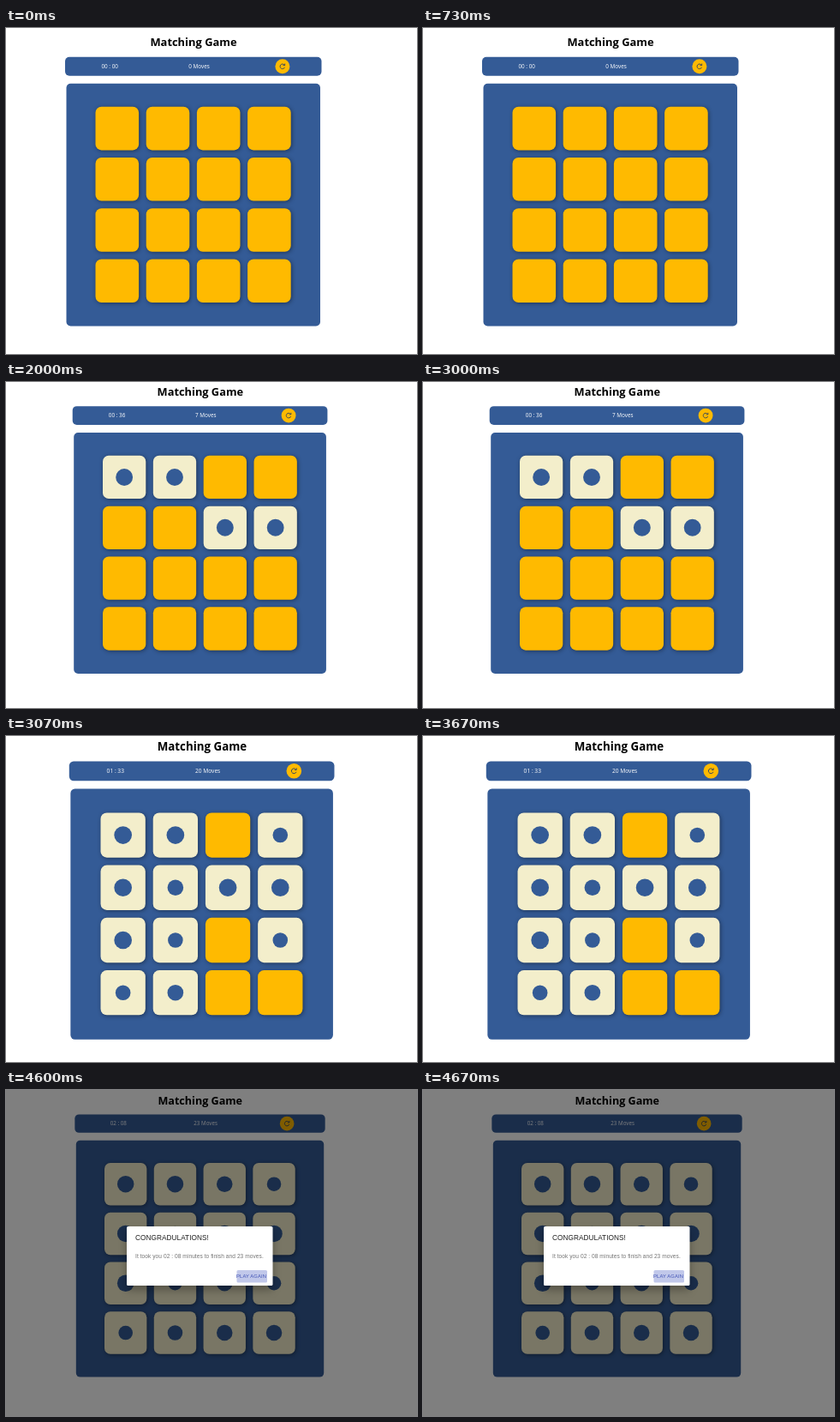
Write an HTML page that moves like this. It is 480 px wide and 380 px high and loops after 6140 ms.

```html
<!DOCTYPE html>
<html lang="en">
<head>
<meta charset="utf-8">
<title>Matching Game</title>
<style>
  html, body { margin: 0; width: 100%; height: 100%; overflow: hidden; background: #fff; }
  svg { display: block; }
  .blue { fill: #345b96; }
  .card { fill: #ffba00; filter: drop-shadow(1.5px 1.5px 2.5px rgba(0, 0, 0, .42)); }
  .card.open { fill: #f3eecb; }
  text { font-family: "Open Sans", "Noto Sans", sans-serif; }
  .title { font-size: 12.9px; font-weight: 700; text-anchor: middle; }
  .info { font-size: 6.4px; fill: #fff; text-anchor: middle; }
  .reload { fill: none; stroke: #2f4260; stroke-width: .9; }
  .modal { fill: #fff; filter: drop-shadow(0 5px 5px rgba(0, 0, 0, .3)); }
  .modal ~ text { font-family: "Liberation Sans", Arial, sans-serif; }
  .head { font-size: 8.24px; letter-spacing: .0075em; fill: #212121; }
  .body { font-size: 6.59px; letter-spacing: .0094em; fill: #757575; }
  .again { font-size: 5.77px; letter-spacing: .0286em; fill: #3f51b5; }
</style>
</head>
<body>
<svg id="stage" width="480" height="380" viewBox="0 0 480 380"></svg>
<script>
const LOOP = 6140;
const PITCH = 59.2, SIZE = 50.6;
const DECK = "GCDFAPGCAERFEPRD";
const RADIUS = { G: 10, C: 10, D: 9.5, F: 8.5, A: 10, P: 9, E: 8.5, R: 9.5 };

// x, y: corner of the first card; lift: small title offset; open: 1 for each revealed card
const scenes = [
  { at: 0, x: 104.5, y: 91.8, scale: 1, lift: 0, time: "00 : 00", moves: 0, open: "0000000000000000" },
  { at: 1530, x: 113, y: 85.8, scale: .994, lift: .6, time: "00 : 36", moves: 7, open: "1100001100000000" },
  { at: 3070, x: 110.5, y: 89.4, scale: 1.034, lift: .9, time: "01 : 33", moves: 20, open: "1101111111011100" },
  { at: 4600, x: 115, y: 85, scale: .976, lift: 1.2, time: "02 : 08", moves: 23, open: "1111111111111111", won: true },
];

const rect = (cls, x, y, w, h, r) =>
  `<rect class="${cls}" x="${x}" y="${y}" width="${w}" height="${h}" rx="${r}"/>`;
const text = (cls, x, y, str) => `<text class="${cls}" x="${x}" y="${y}">${str}</text>`;

function card(kind, i, open) {
  const x = i % 4 * PITCH, y = Math.floor(i / 4) * PITCH;
  const face = rect(open ? "card open" : "card", x, y, SIZE, SIZE, 7);
  const mark = `<circle class="blue" cx="${x + SIZE / 2}" cy="${y + SIZE / 2}" r="${RADIUS[kind]}"/>`;
  return open ? face + mark : face;
}

const dialog = s =>
  '<rect width="480" height="380" opacity=".5"/>' +
  rect("modal", 141, 159, 170.5, 69, 1.6) +
  text("head", 151, 175, "CONGRADULATIONS!") +
  text("body", 151, 195.6, `It took you ${s.time} minutes to finish and ${s.moves} moves.`) +
  '<rect x="269.5" y="210" width="35.5" height="14.5" rx="1.6" fill="#c1c8ea"/>' +
  text("again", 269, 219.2, "PLAY AGAIN");

const draw = s => `<g display="none">
  <g transform="translate(${s.x} ${s.y}) scale(${s.scale})">
    ${text("title", 114.5, -71.2 + s.lift, "Matching Game")}
    ${rect("blue", -35.5, -58, 299.5, 22, 5)}
    ${rect("blue", -34, -27, 296.5, 282.7, 5)}
    ${text("info", 16.7, -44.6, s.time)}
    ${text("info", 121, -44.6, s.moves + " Moves")}
    <g transform="translate(218.4 -47)">
      <circle r="8.5" fill="#ffba00"/>
      <path class="reload" d="M2.2-1.7A2.8 2.8 0 1 0 2.6 1M2.8-3.3V-1.2H.7"/>
    </g>
    ${[...DECK].map((kind, i) => card(kind, i, s.open[i] === "1")).join("")}
  </g>
  ${s.won ? dialog(s) : ""}
</g>`;

const stage = document.getElementById("stage");
stage.innerHTML = scenes.map(draw).join("");
const layers = [...stage.children];

function tick() {
  const t = performance.now() % LOOP;
  const current = scenes.filter(s => s.at <= t).length - 1;
  layers.forEach((g, i) => g.setAttribute("display", i === current ? "inline" : "none"));
  requestAnimationFrame(tick);
}
tick();
</script>
</body>
</html>
```
